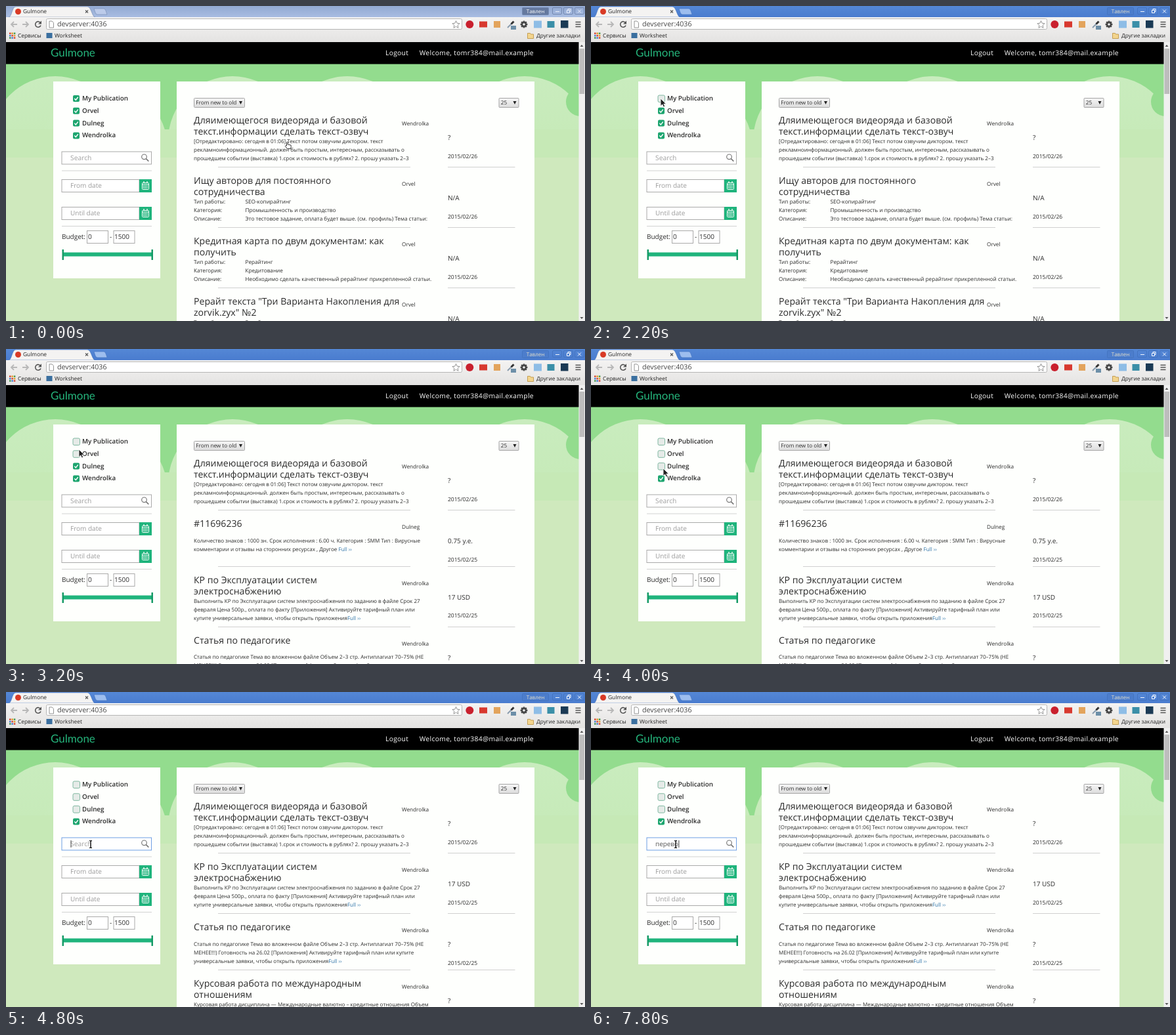
An HTML page that plays this animation: 882 px wide and 480 px high, repeating every 8000 ms.

```html
<!DOCTYPE html>
<html lang="ru">
<head>
<meta charset="utf-8">
<title>Job feed filter</title>
<style>
  html, body { margin: 0; width: 100%; height: 100%; overflow: hidden; background: #fff; }
  svg { display: block; font-family: "Open Sans", "Noto Sans", sans-serif; text-rendering: geometricPrecision; }
</style>
</head>
<body>
<svg id="stage" width="882" height="480" viewBox="0 0 882 480"></svg>
<script>
const LOOP = 8000, TICK = 200;
const GREEN = '#1fb47c', INK = '#2b2b2b', MEADOW = '#93dc8e', PALE = '#cfe9bd';

// Markup helpers
const rect = (x, y, w, h, fill, extra = '') =>
  `<rect x="${x}" y="${y}" width="${w}" height="${h}" fill="${fill}" ${extra}/>`;
const box = (x, y, w, h, stroke = '#aaa', fill = '#fff', extra = '') =>
  rect(x + .5, y + .5, w - 1, h - 1, fill, `stroke="${stroke}" ${extra}`);
const circle = (x, y, r, fill, extra = '') => `<circle cx="${x}" cy="${y}" r="${r}" fill="${fill}" ${extra}/>`;
const line = (d, stroke, width = 1, extra = '') =>
  `<path d="${d}" fill="none" stroke="${stroke}" stroke-width="${width}" ${extra}/>`;
const shape = (d, fill, extra = '') => `<path d="${d}" fill="${fill}" ${extra}/>`;
const text = (x, y, size, str, fill = INK, extra = '') =>
  `<text x="${x}" y="${y}" font-size="${size}" fill="${fill}" ${extra}>${str}</text>`;
const gradient = (id, from, to) =>
  `<linearGradient id="${id}" x2="0" y2="1"><stop stop-color="${from}"/><stop offset="1" stop-color="${to}"/></linearGradient>`;
const link = '<tspan fill="#2d72a8">Full ››</tspan>';

// Feed entries
const SITES = ['My Publication', 'Orvel', 'Dulneg', 'Wendrolka'];
const [, ORVEL, DULNEG, WENDROLKA] = SITES;
const entry = (title, site, price, date, desc) => ({ title, site, price, date: '2015/02/' + date, desc });
const specs = (kind, category, about) =>
  [['Тип работы:', kind], ['Категория:', category], ['Описание:', about]];

const video = entry(['Дляимеющегося видеоряда и базовой', 'текст.информации сделать текст-озвуч'], WENDROLKA, '?', 26, [
  '[Отредактировано: сегодня в 01:06] Текст потом озвучим диктором. текст',
  'рекламноинформационный. должен быть простым, интересным, рассказывать о',
  'прошедшем событии (выставка) 1.срок и стоимость в рублях? 2. прошу указать 2–3']);
const authors = entry(['Ищу авторов для постоянного', 'сотрудничества'], ORVEL, 'N/A', 26,
  specs('SEO-копирайтинг', 'Промышленность и производство', 'Это тестовое задание, оплата будет выше. (см. профиль) Тема статьи:'));
const card = entry(['Кредитная карта по двум документам: как', 'получить'], ORVEL, 'N/A', 26,
  specs('Рерайтинг', 'Кредитование', 'Необходимо сделать качественный рерайтинг прикрепленной статьи.'));
const rewrite = entry(['Рерайт текста "Три Варианта Накопления для', 'zorvik.zyx" №2'], ORVEL, 'N/A', 26,
  specs('Рерайтинг', 'Финансы', 'Рерайт статьи по образцу.'));
const order = entry(['#11696236'], DULNEG, '0.75 у.е.', 25, [
  'Количество знаков : 1000 зн. Срок исполнения : 6.00 ч. Категория : SMM Тип : Вирусные',
  'комментарии и отзывы на сторонних ресурсах , Другое ' + link]);
const systems = entry(['КР по Эксплуатации систем', 'электроснабжению'], WENDROLKA, '17 USD', 25, [
  'Выполнить КР по Эксплуатации систем электроснабжения по заданию в файле Срок 27',
  'февраля Цена 500р., оплата по факту [Приложения] Активируйте тарифный план или',
  'купите универсальные заявки, чтобы открыть приложения' + link]);
const article = entry(['Статья по педагогике'], WENDROLKA, '?', 25, [
  'Статья по педагогике Тема во вложенном файле Объем 2–3 стр. Антиплагиат 70–75% (НЕ',
  'МЕНЕЕ!!!) Готовность на 26.02 [Приложения] Активируйте тарифный план или купите',
  'универсальные заявки, чтобы открыть приложения' + link]);
const course = entry(['Курсовая работа по международным', 'отношениям'], WENDROLKA, '?', 25,
  ['Курсовая работа дисциплина — Международные валютно – кредитные отношения Объем']);

// Timelines: each step holds until the next one
const FEED = [
  [0, [video, authors, card, rewrite]],
  [3200, [video, order, systems, article]],
  [4200, [video, systems, article, course]]];
const UNCHECKED = [[0, 0], [2200, 1], [2800, 2], [4000, 3]];
const ACTIVE = [[0, false], [2200, true]];
const FOCUS = [[0, false], [4800, true]];
const CARET = [[0, false], [4800, true], [5600, false], [6000, true], [6800, false], [7000, true]];
const TYPED = [[0, ''], [7000, 'п'], [7200, 'пе'], [7400, 'пер'], [7600, 'перев'], [7800, 'перево']];
const POINTER = [
  [0, ['hand', 425, 206]], [200, ['hand', 452, 224]], [400, ['hand', 420, 218]],
  [600, ['hand', 318, 206]], [800, ['arrow', 205, 178]], [1000, ['arrow', 136, 150]],
  [1200, ['arrow', 104, 138]], [1400, ['arrow', 95, 138]], [1600, ['arrow', 106, 141]],
  [2400, ['arrow', 111, 153]], [3400, ['arrow', 111, 170]], [3600, ['arrow', 110, 182]],
  [4400, ['arrow', 116, 204]], [4600, ['beam', 127, 228]], [4800, ['beam', 129, 232]]];
const at = (steps, t) => steps.findLast(step => step[0] <= t)[1];

// Browser window
function titleBar(active) {
  const glyph = active ? '#f4f8ff' : '#e8eefa', edge = active ? '#4474c0' : '#7388b0';
  return rect(0, 0, 882, 17, `url(#${active ? 'frameOn' : 'frameOff'})`) +
    shape('M4 17C9 17 9 1 15 1H124C130 1 131 17 136 17Z', '#f4f3f2', `stroke="${edge}" stroke-width=".6"`) +
    shape('M134 4H149Q151 4 152 7L154 13H139Q137 13 136 10Z', active ? '#9dbdee' : '#bccbea', `stroke="${edge}" stroke-width=".6"`) +
    circle(18.5, 8.5, 4.5, '#d93a26') + text(26, 11.3, 8.4, 'Gulmone', '#222') +
    line('M121 6.5l4 4m0-4l-4 4', '#555', 1.1) +
    box(786, 2, 41, 12, edge, active ? '#4c7dcc' : '#65799f', 'rx="1"') +
    text(806.5, 10.8, 8, 'Тавлен', active ? '#e6e0c8' : '#fff', 'text-anchor="middle"') +
    [832, 849, 866].map(x => box(x, 2, 15, 11, edge, 'none', 'rx="1.5"')).join('') +
    line('M837 8.5h6M854.5 6.5h4v4h-4zM856 6v-1.500h4v4h-1M871 5.500l5 5m0-5l-5 5', glyph);
}

function toolbar() {
  const dots = ['#d94a38', '#e0a12c', '#4a9a52', '#4a7fd0', '#d94a38', '#e0a12c', '#4a9a52', '#4a7fd0', '#d94a38'];
  const gear = Array.from({ length: 4 }, (_, i) =>
    rect(787.7, 22.6, 2.6, 10.8, '#444', `transform="rotate(${i * 45} 789 28)"`)).join('');
  return rect(0, 17, 882, 38, 'url(#bar)') +
    line('M17 28H8m4-4l-4 4 4 4M25 28h9m-4-4l4 4-4 4', '#b8b8b8', 1.8) +
    line('M52.500 25.500A4.300 4.300 0 1 0 53 29.500', '#555', 1.6) + shape('M54 22.500v5h-5z', '#555') +
    box(61, 19, 634, 17, '#b5b5b5', '#fff', 'rx="2"') +
    shape('M66 23h4l2.500 2.500v7.500h-6.500z', '#fff', 'stroke="#888" stroke-width=".9"') +
    text(78, 31.2, 10.6, 'devserver:4036', '#444') +
    shape('M685.500 22.500l1.600 3.700 4 .4-3 2.700.9 4-3.500-2.100-3.500 2.100.9-4-3-2.700 4-.4z', '#fff', 'stroke="#888" stroke-width=".9"') +
    circle(706.3, 28, 6, '#c9202e') + rect(721, 23.5, 12, 9, '#d8392f') + rect(743, 23, 10, 10, '#e3a45c') +
    line('M764 33l6-6', '#8a9cae', 2) + line('M769.500 27.500l4-4', '#333', 3) + rect(769, 30, 8, 6, '#6d8fa8') +
    gear + circle(789, 28, 4, '#444') + circle(789, 28, 1.8, '#eee') +
    rect(804, 22.5, 12, 11, '#8ebde6') + rect(824.5, 23, 11, 10, '#3b8fa8') + rect(845, 22, 11.5, 11.5, '#1b3a55') +
    line('M867.500 24.500h8m-8 3.500h8m-8 3.500h8', '#555', 1.7) +
    dots.map((c, i) => rect(5 + i % 3 * 3.4, 40.5 + Math.floor(i / 3) * 3.4, 2.5, 2.5, c)).join('') +
    text(18, 48, 8.4, 'Сервисы', '#222') + rect(61.5, 41, 9, 8, '#3a6f9f') + text(74, 48, 8.4, 'Worksheet', '#222') +
    shape('M794.500 41.500h4l1 1.500h4v6.500h-9z', '#f3d58e', 'stroke="#b98e3c" stroke-width=".8"') +
    text(808, 48, 8.3, 'Другие закладки', '#222');
}

// Page
function backdrop() {
  const hills = [75, 345, 520, 790].map(x => circle(x, 205, 98, 'url(#hill)')).join('') +
    [150, 715].map(x => circle(x, 216, 96, 'url(#hill)')).join('');
  return rect(0, 88, 873, 144, MEADOW) + hills + rect(0, 188, 873, 44, '#c6e9b6') +
    circle(875, 146, 22, MEADOW) + rect(0, 231, 873, 249, PALE) +
    rect(0, 55, 873, 33.5, '#000') +
    text(68, 77, 17, 'Gulmone', '#25b57c', 'font-family="Lato, sans-serif"') +
    text(578, 75.2, 10.3, 'Logout', '#fff', 'letter-spacing=".3"') +
    text(804, 75.2, 10.3, 'Welcome, tomr384@mail.example', '#fff', 'letter-spacing=".35" text-anchor="end"') +
    rect(72, 115, 163, 300, '#fefffd') + rect(260, 115, 545, 365, '#fefffd') +
    rect(872.5, 55, 9.5, 425, '#f0f0f0') + rect(873.5, 65, 7.5, 69, '#bdbdbd') +
    shape('M874.500 62l2.500-3 2.500 3zM874.500 474l2.500 3 2.500-3z', '#555');
}

function dropdown(x, w, label) {
  return box(x, 140, w, 15, '#a6a6a6', 'url(#button)', 'rx="1"') + text(x + 3.3, 150.4, 8.2, label) +
    shape(`M${x + w - 9} 145h5l-2.500 5z`, '#222');
}

function dateField(y, label) {
  return box(84.5, y, 119, 20) + text(98, y + 13.2, 10, label, '#9b9b9b') + rect(203, y, 19, 20, GREEN) +
    box(207, y + 5, 11, 11, '#fff', 'none', 'rx="1"') +
    line(`M207 ${y + 8}h11M210 ${y + 3}v3m5-3v3`, '#fff', 1.2) +
    line(`M209 ${y + 10.5}h7m-7 2.500h7`, '#fff', 1.3, 'stroke-dasharray="1.500 1"');
}

function sidebar() {
  return line('M85 251h137M85 335.500h137', '#d2d2d2') +
    dateField(264, 'From date') + dateField(306, 'Until date') +
    text(85, 355.3, 10, 'Budget:') + box(123, 342, 33, 20) + text(125, 355.3, 10, '0') +
    text(158, 355.3, 10, '-') + box(163.5, 342, 33, 20) + text(165, 355.3, 10, '1500') +
    rect(86, 375.5, 138, 6, GREEN) + rect(85.5, 371, 2.5, 16, '#159a66') + rect(221.5, 371, 2.5, 16, '#159a66');
}

function checkboxes(unchecked) {
  return SITES.map((name, i) => {
    const y = 136 + i * 18.8;
    const mark = i < unchecked
      ? rect(102, y, 10.5, 10.5, '#e6ebe8', 'rx="2" stroke="#7fb8a0"')
      : rect(102, y, 10, 10, '#1da56f', 'rx="2"') + line(`M104.300 ${y + 5}l2 2.300 3.500-4.500`, '#fff', 1.4);
    return mark + text(116, y + 8, 9.8, name, INK, 'font-weight="600"');
  }).join('');
}

function searchField(focused) {
  return box(84.5, 221.5, 137.5, 20, focused ? '#6f9fe4' : '#aaa') +
    circle(210.5, 229.8, 3.8, 'none', 'stroke="#777" stroke-width="1.2"') + line('M213.300 232.600l4 4', '#777', 1.6);
}

function feed(entries) {
  let y = 174;
  return entries.map(({ title, site, price, date, desc }) => {
    const short = title.length === 1, top = y, descTop = top + (short ? 26 : 32.5);
    const end = top + (short ? 65.5 : 72);
    y = end + 20;
    return title.map((s, i) => text(286, top + 5 + i * 17, 14.1, s)).join('') +
      desc.map((s, i) => {
        const base = descTop + 2.8 + i * 13;
        return Array.isArray(s) ? text(286, base, 8.2, s[0]) + text(364.5, base, 8.2, s[1]) : text(286, base, 8.07, s);
      }).join('') +
      text(603, top + 8.3, 8.2, site) + text(673, top + 30.2, 10, price) + text(673, top + 57.6, 8.5, date) +
      line(`M323 ${Math.round(end) - .5}h293m57 0h102.500`, '#d0d0d0');
  }).join('');
}

const POINTERS = {
  arrow: shape('M0 0V11.500L2.700 9 4.500 13 6.600 12 4.800 8.200H8.300Z', '#222', 'stroke="#fff" stroke-width=".8"'),
  hand: shape('M2.500 7V1.500Q3.300 0 4.200 1.500V5L9 6Q9.800 8 8.500 11.500H3.500L.3 7.500Q.8 5.800 2.500 7Z', '#fff', 'stroke="#222" stroke-width=".9"'),
  beam: line('M-2 -5.500Q0 -5.500 0 -4.500Q0 -5.500 2 -5.500M0 -4.500V4.500M-2 5.500Q0 5.500 0 4.500Q0 5.500 2 5.500', '#222', 1.5)
};

// Assembly
const stage = document.getElementById('stage');
const layer = id => `<g id="${id}"></g>`;
stage.innerHTML = '<defs>' + gradient('frameOn', '#5487d5', '#4a7ccf') + gradient('frameOff', '#92a9d2', '#a9bde2') +
  gradient('bar', '#f4f3f2', '#e4e3e2') + gradient('button', '#f6f6f6', '#dcdcdc') +
  gradient('hill', '#c9ecbe', '#c4e8b3') + '</defs>' +
  layer('frame') + toolbar() + backdrop() + sidebar() +
  dropdown(286, 78, 'From new to old') + dropdown(750.5, 31, '25') +
  ['boxes', 'search', 'list', 'pointer'].map(layer).join('');
const [frame, boxes, search, list, pointer] =
  ['frame', 'boxes', 'search', 'list', 'pointer'].map(id => document.getElementById(id));

function render(t) {
  const typed = at(TYPED, t), [kind, x, y] = at(POINTER, t);
  frame.innerHTML = titleBar(at(ACTIVE, t));
  boxes.innerHTML = checkboxes(at(UNCHECKED, t));
  list.innerHTML = feed(at(FEED, t));
  search.innerHTML = searchField(at(FOCUS, t)) +
    text(98, 234.5, typed ? 9.9 : 10.3, typed || 'Search', typed ? '#555' : '#a0a0a0');
  if (at(CARET, t)) {
    const width = typed ? search.querySelector('text').getComputedTextLength() : 0;
    search.innerHTML += rect(98.5 + width, 226, 1, 11, '#444');
  }
  pointer.innerHTML = `<g transform="translate(${x} ${y})">${POINTERS[kind]}</g>`;
}

let shown = -1;
function loop() {
  const tick = Math.floor(performance.now() % LOOP / TICK);
  if (tick !== shown) render((shown = tick) * TICK);
  requestAnimationFrame(loop);
}
loop();
</script>
</body>
</html>
```
